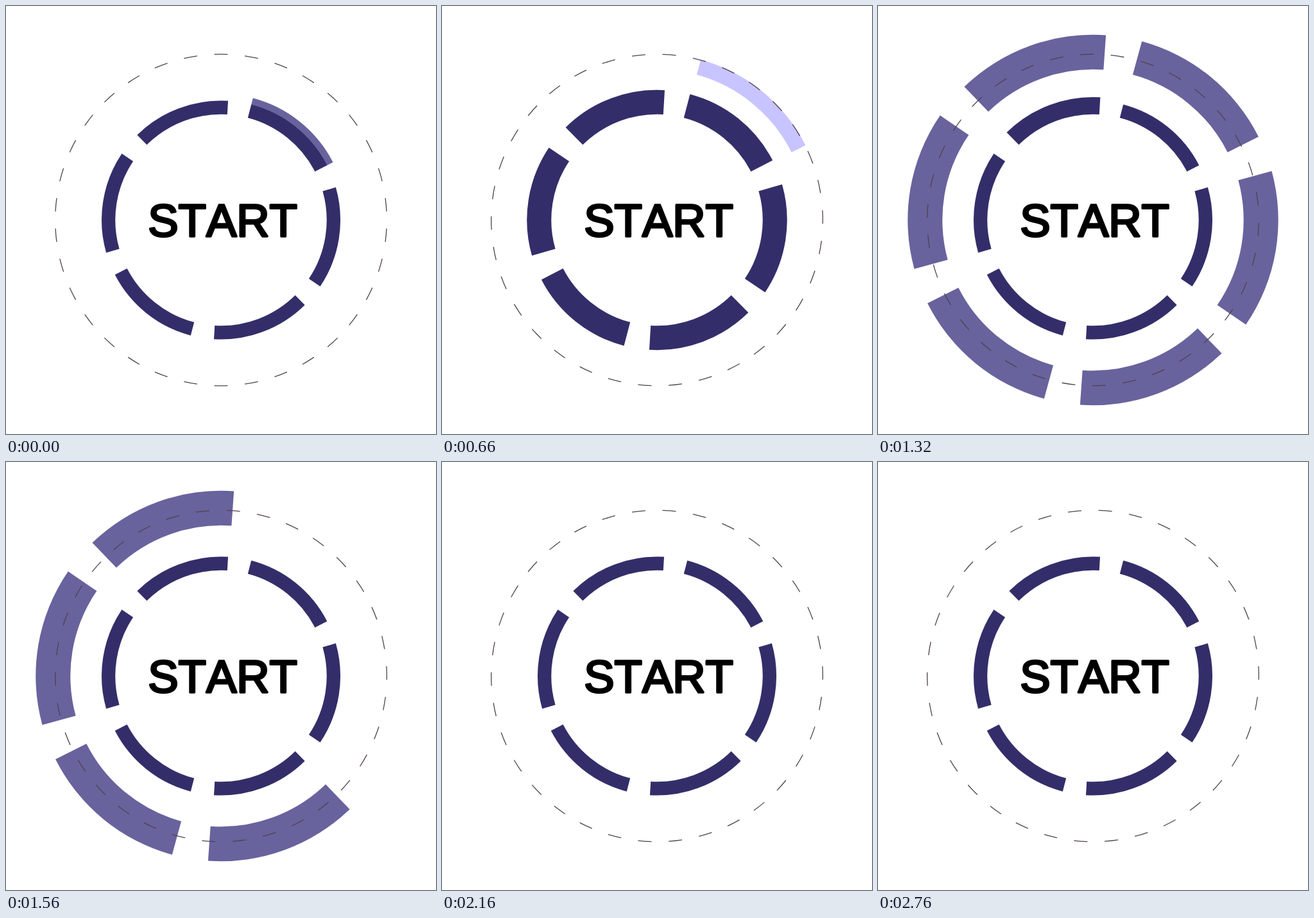
Animation, 670 px wide and 667 px high, one loop 2790 ms. Source, as an HTML page:

```html
<!DOCTYPE html>
<html lang="en">
<head>
<meta charset="utf-8">
<title>Start ring</title>
<style>
  html, body { margin: 0; width: 100%; height: 100%; overflow: hidden; background: #fff; }
  svg { display: block; width: 670px; height: 667px; }
  text {
    font: 71px "Liberation Sans", Arial, sans-serif;
    font-kerning: none;
    fill: #000; stroke: #000; stroke-width: 3.3; stroke-linejoin: round;
  }
</style>
</head>
<body>
<svg viewBox="0 0 670 667">
  <g id="segments" transform="translate(335 333.5)"></g>
  <circle id="dashes" r="258.3" fill="none" stroke="#4e424c" stroke-width="1.3"
    pathLength="34" stroke-dasharray="0.44 0.56" stroke-dashoffset="0.22"/>
  <text x="221.2" y="359.2">START</text>
</svg>
<script>
const LOOP = 2790, STEP = 30, STAGGER = 4;
const GROW = 0, RELEASE = 22, VANISH = 45; // start steps of the three waves
const DARK = '#332e69', MID = '#68639d', PALE = '#c8c4ff';
const INNER = { base: 164.7, thin: 186, wide: 202.7 };
const OUTER = { base: 234.7, full: 288.7 };
const PITCH = 360 / 34;

const group = document.getElementById('segments');
const dashes = document.getElementById('dashes');

const addPath = fill => {
  const path = document.createElementNS('http://www.w3.org/2000/svg', 'path');
  path.setAttribute('fill', fill);
  return group.appendChild(path);
};

// Angles run clockwise from twelve o'clock; opposite segments mirror each other.
const segments = [14.7, 74.1, 135.4, 194.7, 254.1, 315.4].map((from, i) => ({
  from,
  to: from + (i % 3 === 1 ? 49.7 : 48),
  glow: addPath(MID),
  inner: addPath(DARK),
  outer: addPath(MID)
}));

const lerp = (a, b, p) => a + (b - a) * p;

function point(radius, degrees) {
  const a = degrees * Math.PI / 180;
  return `${(radius * Math.sin(a)).toFixed(2)} ${(-radius * Math.cos(a)).toFixed(2)}`;
}

function band(r0, r1, from, to) {
  if (r1 <= r0) return '';
  return `M${point(r0, from)}L${point(r1, from)}A${r1} ${r1} 0 0 1 ${point(r1, to)}` +
    `L${point(r0, to)}A${r0} ${r0} 0 0 0 ${point(r0, from)}Z`;
}

function innerWidth(grow, release) {
  if (grow < 1) return 0;
  return 1 - Math.min(1, Math.max(0, release / 3));
}

function outerState(release, vanish) {
  if (release < 0 || vanish > 0) return [0, MID];
  if (release === 0 || vanish === 0) return [0.45, PALE];
  if (release === 1) return [0.85, '#8a83be'];
  return [1, MID];
}

function render(time) {
  const step = Math.floor((time % LOOP) / STEP);

  segments.forEach(({ from, to, glow, inner, outer }, i) => {
    const local = step - i * STAGGER;
    const grow = local - GROW, release = local - RELEASE, vanish = local - VANISH;

    const edge = lerp(INNER.thin, INNER.wide, innerWidth(grow, release));
    inner.setAttribute('d', band(INNER.base, edge, from, to));

    const glowEdge = grow === 0 ? lerp(INNER.thin, INNER.wide, 0.62) : 0;
    glow.setAttribute('d', band(INNER.thin - 1, glowEdge, from, to));

    const [size, color] = outerState(release, vanish);
    outer.setAttribute('d',
      band(OUTER.base, lerp(OUTER.base, OUTER.full, size), from + 0.6, to + 0.6));
    outer.setAttribute('fill', color);
  });

  const turn = step * PITCH / 5 - 90;
  dashes.setAttribute('transform', `translate(335 333.5) rotate(${turn})`);
}

const start = performance.now();
function tick() {
  render(performance.now() - start);
  requestAnimationFrame(tick);
}
tick();
</script>
</body>
</html>
```
